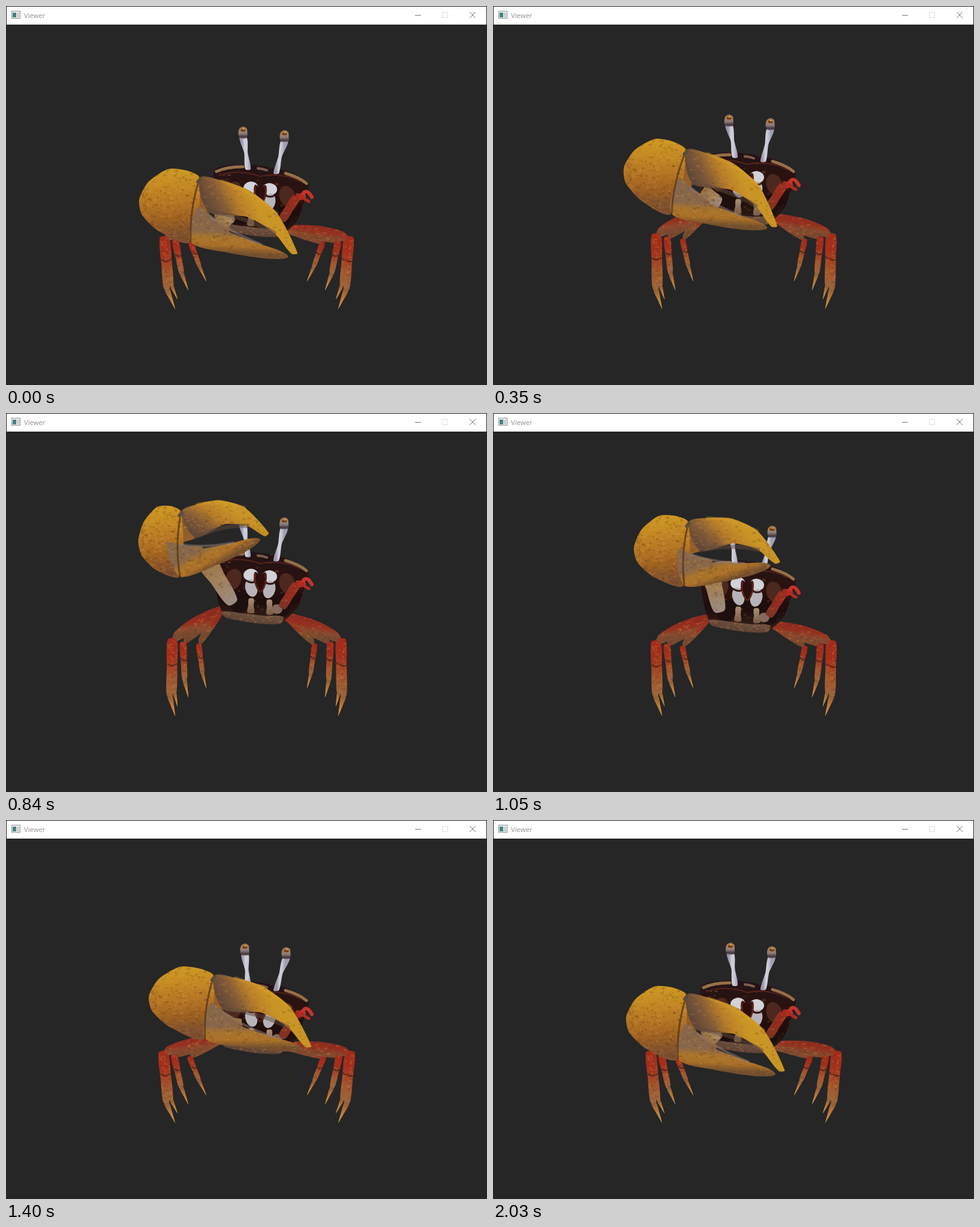
Recreate the animation shown at these times as an HTML page with a canvas. Size 802 px wide and 632 px high, loop 2100 ms.

```html
<!DOCTYPE html>
<html lang="en">
<head>
<meta charset="utf-8">
<title>Viewer</title>
<style>
html, body { margin: 0; width: 100%; height: 100%; overflow: hidden; background: #262626; }
canvas, svg { position: absolute; left: 0; top: 0; }
text { font: 11.3px "Open Sans", "Noto Sans", sans-serif; fill: #8f8f8f; }
</style>
</head>
<body>
<canvas id="stage" width="802" height="632"></canvas>
<svg width="802" height="632" fill="none">
  <rect x="1" y="1" width="800" height="30" fill="#fff"/>
  <path d="M0 .5H802M.5 0V31M801.5 0V31" stroke="#202020"/>
  <rect x="9.5" y="8.5" width="14" height="12" fill="#f4f4f4" stroke="#8a8f92"/>
  <rect x="11" y="11" width="6" height="8" fill="#3f8580"/>
  <rect x="18" y="11" width="4" height="8" fill="#c9cdd0"/>
  <text x="30" y="20">Viewer</text>
  <path d="M682 15.5H692M773 10L783 20M783 10L773 20" stroke="#777"/>
  <rect x="727.5" y="10.5" width="9" height="9" stroke="#e0e0e0"/>
</svg>
<script>
const ctx = document.getElementById('stage').getContext('2d');
const LOOP = 2100, STEP = 70;

// The big claw hangs on four joints: seam top, seam bottom, upper tip, lower tip.
const rest = [323,287, 308,393, 486,412, 470,417];
const wave = [292,165, 290,272, 438,200, 423,210];
const moved = (list, dx, dy) => list.map((v, i) => v + (i % 2 ? dy : dx));

// Time, body height, palm width, joints.
const keys = [
  [0, 0, 101, ...rest],
  [350, -20, 101, 322,241, 298,346, 474,367, 457,369],
  [630, -37, 98, 322,198, 293,302, 468,315, 457,317],
  [840, -33, 75, ...wave],
  [940, -28, 78, ...moved(wave, 5, -9)],
  [1190, -8, 110, 355,220, 342,322, 515,320, 498,322],
  [1680, 16, 101, ...moved(rest, 0, 12)]
];

function keyAt(i) {
  const n = keys.length, k = keys[(i + n) % n].slice();
  k[0] += Math.floor(i / n) * LOOP;
  return k;
}

// Smooth periodic interpolation of every pose value.
function poseAt(t) {
  const i = keys.findLastIndex(k => k[0] <= t);
  const [a, b, c, d] = [i - 1, i, i + 1, i + 2].map(keyAt);
  const span = c[0] - b[0], u = (t - b[0]) / span, u2 = u * u, u3 = u2 * u;
  return b.map((v, j) => {
    const m0 = (c[j] - a[j]) / (c[0] - a[0]) * span;
    const m1 = (d[j] - v) / (d[0] - b[0]) * span;
    return (2 * u3 - 3 * u2 + 1) * v + (u3 - 2 * u2 + u) * m0
      + (3 * u2 - 2 * u3) * c[j] + (u3 - u2) * m1;
  }).slice(1);
}

const pairs = list => Array.from({ length: list.length / 2 }, (_, i) => [list[2 * i], list[2 * i + 1]]);
const mix = (a, b, u) => a.map((v, i) => v + (b[i] - v) * u);

// Outlines as (fraction along an axis, offset across it).
const palmShape = pairs([0,0, -.09,.24, -.07,.54, .17,.83, .46,.94, .69,.86, .91,.54, 1,0]);
const upperShape = pairs([0,0, .155,-19, .38,-34, .67,-32, 1,0, .963,7, .75,-3, .5,3, .22,35]);
const lowerShape = pairs([.02,-59, .16,-47, .37,-26, .71,-13, 1,0, .82,9, .39,9, 0,0]);

function along(a, b, shape, size = 1) {
  const dx = b[0] - a[0], dy = b[1] - a[1], len = Math.hypot(dx, dy) || 1;
  return shape.map(([u, v]) => [a[0] + dx * u - dy / len * v * size, a[1] + dy * u + dx / len * v * size]);
}

let seed;
const rnd = () => (seed = seed * 16807 % 2147483647) / 2147483647;

function trace(p) {
  const n = p.length, at = i => p[(i + n) % n];
  const dir = i => {
    const dx = at(i + 1)[0] - at(i - 1)[0], dy = at(i + 1)[1] - at(i - 1)[1];
    const len = Math.hypot(dx, dy) || 1;
    return [dx / len, dy / len];
  };
  ctx.beginPath();
  ctx.moveTo(...p[0]);
  for (let i = 0; i < n; i++) {
    const a = at(i), b = at(i + 1), s = dir(i), e = dir(i + 1);
    const r = Math.hypot(b[0] - a[0], b[1] - a[1]) * .23;
    ctx.bezierCurveTo(a[0] + s[0] * r, a[1] + s[1] * r, b[0] - e[0] * r, b[1] - e[1] * r, ...b);
  }
}

function speckle(p, count) {
  const xs = p.map(q => q[0]), ys = p.map(q => q[1]);
  const x = Math.min(...xs), y = Math.min(...ys);
  const w = Math.max(...xs) - x, h = Math.max(...ys) - y;
  ctx.save();
  ctx.clip();
  for (let i = 0; i < count; i++) {
    const v = rnd();
    ctx.fillStyle = rnd() < .35 + v * .35 ? 'rgba(90,46,22,.2)' : 'rgba(215,155,65,.2)';
    ctx.fillRect(x + rnd() * w, y + v * h, 1 + rnd() * 5, 1 + rnd() * 3);
  }
  ctx.restore();
}

// Smooth shape shaded from one point to another.
function part(p, from, to, colors, specks = 0) {
  const g = ctx.createLinearGradient(...from, ...to);
  colors.forEach((c, i) => g.addColorStop(i / (colors.length - 1), c));
  ctx.fillStyle = g;
  trace(p);
  ctx.fill();
  if (specks) speckle(p, specks);
}

function oval(x, y, rx, ry, color, turn = 0) {
  ctx.fillStyle = color;
  ctx.beginPath();
  ctx.ellipse(x, y, rx, ry, turn, 0, 7);
  ctx.fill();
}

function curve(a, c, b, color, width) {
  ctx.strokeStyle = color;
  ctx.lineWidth = width;
  ctx.beginPath();
  ctx.moveTo(...a);
  ctx.quadraticCurveTo(...c, ...b);
  ctx.stroke();
}

// Limb with start, middle and end widths, shaded lengthwise.
function limb(a, b, w1, wm, w2, colors, specks = 0) {
  const shape = [[0, -w1], [.5, -wm], [1, -w2], [1, w2], [.5, wm], [0, w1]];
  part(along(a, b, shape, .5), a, b, colors, specks);
}

// Back to front: width, then reach from the middle and height of knee, ankle and tip.
const legs = [
  [8, 110,394, 95,435, 84,459],
  [10, 136,391, 125,446, 114,474],
  [9, 150,386, 142,466, 132,489],
  [13, 155,386, 150,471, 136,505]
];

function drawLeg([w, kx, ky, ax, ay, tx, ty], side, dy) {
  const at = (reach, y) => [418 + side * reach, y];
  const hip = [414 + side * 54, 367 + side * 6 + dy];
  const knee = at(kx + dy * .4, ky + dy * .25), ankle = at(ax + dy * .15, ay);
  const [mx, my] = mix(hip, knee, .5);
  const thigh = along(hip, knee, [[0, -w], [.5, -w * 2], [.9, -w * 1.2], [1, w * .7], [.5, w * 1.5], [0, w]], side / 2);
  part(thigh, [mx, my - w], [mx + side * -4, my + w], ['#8f2b20', '#98301f', '#8a4a2e', '#764a30'], w * 9);
  limb(ankle, at(tx, ty), w * .6, w * .4, .4, ['#8a5a35', '#bd7a36', '#d09a4a']);
  limb(knee, ankle, w, w, w * .72, ['#a02a1a', '#a5301d', '#a5552d', '#9c663c'], w * 5);
  const [x, y] = mix(knee, ankle, .46);
  curve([x - w * .4, y - 2], [x, y + 3], [x + w * .4, y], 'rgba(50,20,14,.6)', 2);
}

function drawBody() {
  part(pairs([348,274, 396,264, 430,267, 470,276, 504,296, 496,330, 484,360, 458,382, 420,381, 366,372, 352,338]),
    [425, 268], [420, 384], ['#231316', '#2b120f', '#1d0d0b', '#35211a'], 90);
  curve([351, 276], [368, 268], [395, 268], '#94704a', 5);
  curve([466, 279], [490, 286], [501, 296], '#94704a', 5);
  curve([420, 271], [428, 271], [435, 274], '#7c5d50', 4);
  for (const side of [-1, 1]) {
    // Markings mirror about an axis that tilts with the shell.
    const at = (x, y) => [424 + side * x, y + side * x * .08];
    curve(at(68, 288), at(36, 274), at(0, 284), '#54231a', 2);
    oval(...at(45, 314), 13, 18, '#4c281e', -side * .3);
    oval(...at(36, 352), 15, 18, '#1d0f0d');
    limb(at(15, 344), at(16, 367), 8, 9, 11, ['#a88c74', '#7a5c46']);
    oval(...at(16, 304), 12, 10, '#d2d2d8', side * .15);
    oval(...at(15, 326), 10, 15, '#b7b3b9', side * .25);
    curve(at(22, 315), at(14, 319), at(7, 314), '#32130f', 3);
    oval(...at(5, 314), 5, 16, '#2c0e0c', side * .2);
    curve(at(8, 301), at(12, 316), at(1, 331), '#642419', 2);
  }
  part(pairs([360,364, 395,367, 430,371, 462,373, 458,384, 420,384, 366,374]),
    [410, 362], [406, 385], ['#745543', '#594134'], 80);
}

function drawEye(x, y, baseX, baseY) {
  const neck = x + (baseX - x) * .55;
  part([[x - 6, y + 8], [x + 6, y + 8], [neck + 3, y + 34], [baseX + 4, baseY], [baseX - 5, baseY], [neck - 3, y + 34]],
    [neck - 7, y], [neck + 7, y], ['#9a98ae', '#d2d0da', '#c8c6d2', '#a09eb4']);
  part([[x - 6, y - 7], [x, y - 10], [x + 6, y - 7], [x + 7, y + 1], [x + 6, y + 9], [x - 6, y + 9], [x - 8, y]],
    [x, y - 10], [x, y + 13], ['#94704e', '#a87c54', '#8f7e7c', '#44343a', '#b5b1c0']);
  oval(x, y - 4, 4, 2.5, '#6b3b1c');
  oval(x + 1, y - 6, 3, 1.2, '#d0904c');
}

function drawSmallClaw(dy) {
  const elbow = [484, 319 + dy], x = 502, y = 317 + dy;
  oval(452, 360 + dy, 9, 8, '#84695c');
  limb([460, 357 + dy], elbow, 12, 14, 12, ['#7a3426', '#962d20', '#9a2c20'], 60);
  limb(elbow, [x - 3, y], 12, 11, 9, ['#982a1f', '#c23226']);
  curve([x - 9, y], [x - 2, y - 16], [x + 8, y + 2], '#c5342a', 6);
  curve([x - 9, y], [x - 4, y + 6], [x + 3, y + 9], '#ad2a22', 5);
}

function drawBigClaw([top, bottom, upperTip, lowerTip], width) {
  const palm = along(top, bottom, palmShape, width);
  const upper = along(top, upperTip, upperShape), lower = along(bottom, lowerTip, lowerShape);
  const seam = mix(top, bottom, .5);
  part([top, upper[8], lower[1], lower[2], bottom], top, bottom, ['#7f5832', '#98602a', '#855424'], 60);
  part(palm, palm[2], mix(palm[6], bottom, .4),
    ['#cf9a22', '#c38a23', '#b57724', '#9f6221', '#7f5130'], 480);
  part(lower, lower[2], lower[6], ['#87674a', '#a9752c', '#aa7028', '#75502e'], 260);
  curve(lower[1], lower[2], lower[3], 'rgba(145,128,122,.5)', 4);
  part(upper, upper[2], upper[8], ['#c99525', '#b97e28', '#805a38', '#5f4638'], 300);
  curve(upper[8], upper[7], upper[6], 'rgba(95,72,58,.5)', 7);
  curve(upper[1], upper[2], upper[3], 'rgba(220,165,45,.3)', 5);
  curve(top, [seam[0] - 10, seam[1]], bottom, 'rgba(84,52,24,.75)', 3);
  oval(top[0] - 1, top[1] + 4, 6, 3, '#5b4a3f', -.7);
}

function draw(now) {
  seed = 4321;
  const t = Math.floor(now % LOOP / STEP) * STEP;
  const [dy, width, ...joints] = poseAt(t);
  const [top, bottom, ...tips] = pairs(joints);
  const sway = 2 - 2.5 * Math.cos((t - 450) / LOOP * 2 * Math.PI);
  ctx.fillStyle = '#262626';
  ctx.fillRect(0, 0, 802, 632);
  ctx.lineCap = 'round';
  for (const side of [-1, 1]) legs.forEach(leg => drawLeg(leg, side, dy));
  ctx.save();
  ctx.translate(0, dy);
  drawBody();
  drawEye(394 + sway, 211, 404, 272);
  drawEye(463 + sway, 217, 451, 279);
  ctx.restore();
  const [sx, sy] = mix(top, bottom, .5);
  limb([sx + 38, sy + 20], [378, 349 + dy], 30, 27, 18, ['#93703f', '#a0805a', '#9c8c82'], 90);
  drawSmallClaw(dy);
  drawBigClaw([top, bottom, ...tips], width);
  requestAnimationFrame(draw);
}
requestAnimationFrame(draw);
</script>
</body>
</html>
```
